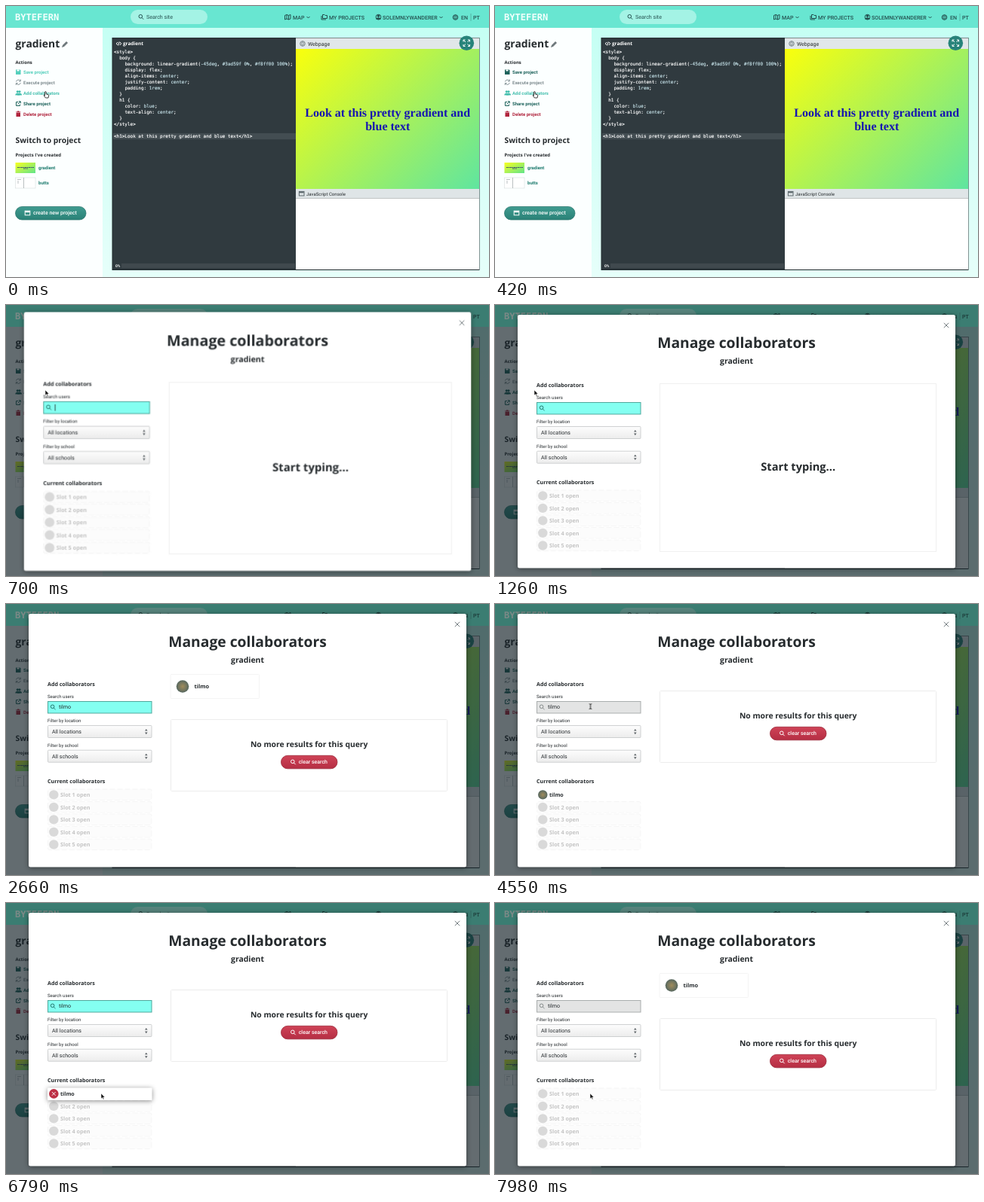
Recreate the animation shown at these times as an HTML page. Size 640 by 360 pixels, loop 8 s.

```html
<!DOCTYPE html>
<html lang="en">
<head>
<meta charset="utf-8">
<title>Manage collaborators</title>
<style>
html, body { margin: 0; width: 100%; height: 100%; overflow: hidden; background: #dcfff8; }
svg { display: block; width: 640px; height: 360px; }
text { text-rendering: geometricPrecision; font: 500 7px Roboto, sans-serif; fill: #262b2e; }
.h { font-family: "Open Sans", "Noto Sans", sans-serif; font-weight: 700; }
.mid { text-anchor: middle; }
.s6 { font-size: 6px; }
.b { font-weight: 700; }
.w { fill: #fff; }
.nav text { fill: #24504f; font-size: 7.08px; }
.nav .brand { font: 700 12.1px "DejaVu Sans Mono", monospace; fill: #f2fffc; }
.page { font: 700 16px "Liberation Serif", serif; fill: #1616b0; }
.code { font: 5.97px "DejaVu Sans Mono", monospace; fill: #fff; stroke: #fff; stroke-width: .15; }
.code .v { fill: #c3dfe6; stroke: #c3dfe6; }
.line { fill: none; stroke: currentColor; stroke-width: 1; }
.label { font-size: 6.05px; font-weight: 400; }
.field { font-size: 7.1px; font-weight: 400; }
.sub { font-size: 7.1px; }
.open { font-size: 7.2px; fill: #c4c4c4; }
.shadow { filter: drop-shadow(0 1px 3px rgba(0,0,0,.45)); }

/* 1% = 80ms */
.save, .add, .first, .results, .card, .cardHover, .member, .slot1, .slotHover, .panel,
.input, .glass, .caret, .type, .hand, .arrow, .ibeam { animation: 8s step-end infinite; }

.save { animation-name: save; }
@keyframes save { 0% { fill: #55cfbc; color: #55cfbc; } 4.4%, 100% { fill: #1d625b; color: #1d625b; } }
.add { animation-name: add; }
@keyframes add { 0% { fill: #45bfae; color: #45bfae; } 8%, 100% { fill: #1d625b; color: #1d625b; } }

.dim { animation: dim 8s linear infinite; }
@keyframes dim { 0% { opacity: 0; } 5.95% { opacity: 0; animation-timing-function: ease; } 7.9%, 100% { opacity: 1; } }
.modal { transform-origin: 320px 181px; animation: pop 8s linear infinite; }
@keyframes pop {
  0% { opacity: 0; transform: scale(.5); }
  6% { opacity: 0; transform: scale(.5); animation-timing-function: cubic-bezier(.54,1.12,.38,1.11); }
  9.75%, 100% { opacity: 1; transform: none; }
}

.first { animation-name: first; }
@keyframes first { 0% { opacity: 1; } 19.25%, 100% { opacity: 0; } }
.results { animation-name: results; }
@keyframes results { 0% { opacity: 0; } 19.25%, 100% { opacity: 1; } }
.type { animation-name: type; animation-fill-mode: backwards; }
@keyframes type { 0% { fill-opacity: 0; } 19.25%, 100% { fill-opacity: 1; } }
.caret { animation-name: caret; }
@keyframes caret { 0% { opacity: 1; } 13%, 100% { opacity: 0; } }

.card, .slot1 { animation-name: free; }
@keyframes free { 0% { opacity: 1; } 46% { opacity: 0; } 86.25%, 100% { opacity: 1; } }
.member { animation-name: taken; }
@keyframes taken { 0% { opacity: 0; } 46% { opacity: 1; } 86.25%, 100% { opacity: 0; } }
.panel { animation-name: panel; }
@keyframes panel { 0% { transform: none; } 46% { transform: translateY(-38px); } 86.25%, 100% { transform: none; } }
.cardHover { animation-name: cardHover; }
@keyframes cardHover { 0% { opacity: 0; } 43.5% { opacity: 1; } 46%, 100% { opacity: 0; } }
.slotHover { animation-name: slotHover; }
@keyframes slotHover { 0% { opacity: 0; } 77.25% { opacity: 1; } 86.25%, 100% { opacity: 0; } }

.input { animation-name: input; }
@keyframes input {
  0% { fill: #84fff1; stroke: #4fa79c; }
  45.5% { fill: #e3e4e4; stroke: #a9adad; }
  59.5% { fill: #84fff1; stroke: #4fa79c; }
  86.25%, 100% { fill: #e3e4e4; stroke: #a9adad; }
}
.glass { animation-name: glass; }
@keyframes glass {
  0% { color: #23766c; } 45.5% { color: #858b8b; }
  59.5% { color: #23766c; } 86.25%, 100% { color: #858b8b; }
}

.pointer { animation: move 8s ease-in-out infinite; }
@keyframes move {
  0%, 40.25% { transform: translate(52px,113px); }
  43.75%, 48.5% { transform: translate(268px,108px); }
  54%, 74.5% { transform: translate(126.5px,136px); }
  78%, 100% { transform: translate(126px,253px); }
}
.hand { animation-name: hand; }
@keyframes hand { 0% { opacity: 1; } 6.5% { opacity: 0; } 43.5% { opacity: 1; } 46%, 100% { opacity: 0; } }
.arrow { animation-name: arrow; }
@keyframes arrow {
  0% { opacity: 0; } 6.5% { opacity: 1; } 19.25% { opacity: 0; } 40.25% { opacity: 1; }
  43.5% { opacity: 0; } 46% { opacity: 1; } 53.5% { opacity: 0; } 75.5%, 100% { opacity: 1; }
}
.ibeam { animation-name: ibeam; }
@keyframes ibeam { 0% { opacity: 0; } 53.5% { opacity: 1; } 75.5%, 100% { opacity: 0; } }
</style>
</head>
<body>
<svg viewBox="0 0 640 360">
  <defs>
    <linearGradient id="mint" x2="0" y2="1"><stop stop-color="#c2fff3"/><stop offset="1" stop-color="#e6fffa"/></linearGradient>
    <linearGradient id="pretty" gradientUnits="userSpaceOnUse" x1="613" y1="257.5" x2="398" y2="42.5">
      <stop stop-color="#5fe5a0"/><stop offset="1" stop-color="#faff0c"/>
    </linearGradient>
    <linearGradient id="thumb" x1="1" y1="1" x2="0" y2="0">
      <stop stop-color="#5fe58a"/><stop offset="1" stop-color="#f8ff20"/>
    </linearGradient>
    <linearGradient id="teal" x2="0" y2="1"><stop stop-color="#409c90"/><stop offset="1" stop-color="#2a8177"/></linearGradient>
    <linearGradient id="red" x2="0" y2="1"><stop stop-color="#cf4357"/><stop offset="1" stop-color="#b52e43"/></linearGradient>
    <linearGradient id="select" x2="0" y2="1"><stop stop-color="#fdfdfd"/><stop offset="1" stop-color="#ececec"/></linearGradient>
    <radialGradient id="face"><stop stop-color="#a08c5c"/><stop offset=".6" stop-color="#77785f"/><stop offset="1" stop-color="#54665f"/></radialGradient>
    <g id="search" class="line"><circle cx="-.7" cy="-.7" r="2.3"/><path d="M1 1L3.2 3.2"/></g>
    <g id="globe" class="line"><circle r="3.3"/><path d="M-3 -1.2H3M-3 1.2H3M0 -3.3Q-3 0 0 3.3Q3 0 0 -3.3" stroke-width=".6"/></g>
    <g id="window" class="line"><rect x="-3.3" y="-2.8" width="6.6" height="5.6"/><path d="M-3 -1.6H3" stroke-width="1.6"/></g>
    <path id="down" class="line" d="M-2 -1L0 1L2 -1"/>
    <g id="slot">
      <rect x=".5" y="-7.2" width="137.5" height="14.6" rx="2" fill="#fcfcfc" stroke="#f0f0f0" stroke-width=".6" stroke-dasharray="7 3"/>
      <circle cx="8.3" cy=".2" r="6.2" fill="#d9d9d9"/>
    </g>
    <g id="dropdown">
      <rect x="55.5" y=".5" width="137.5" height="16" rx="1" fill="url(#select)" stroke="#c3c6c7" stroke-width=".8"/>
      <path d="M184 7.6L185.8 5L187.6 7.6ZM184 9.6L185.8 12.2L187.6 9.6Z" fill="#5d6367"/>
    </g>
    <g id="person"><circle cy="-1.7" r="1.6"/><path d="M-3 3Q-3 .3 0 .3Q3 .3 3 3Z"/></g>
  </defs>

  <rect width="640" height="360" fill="url(#mint)"/>
  <rect width="640" height="29" fill="#68e6d1"/>
  <rect y="29" width="128" height="331" fill="#fcffff"/>

  <g class="nav" color="#24504f">
    <text class="brand" x="12" y="19">BYTEFERN</text>
    <rect x="165" y="5" width="102" height="19" rx="9.5" fill="#a4f3e5"/>
    <use href="#search" x="179" y="14.5"/>
    <text x="186" y="17.2" style="font-weight:400">Search site</text>
    <path class="line" d="M369.5 12.5L372 11.5L374.5 12.5L377 11.5V17L374.5 18L372 17L369.5 18ZM372 11.5V17M374.5 12.5V18" stroke-width=".8"/>
    <text x="380" y="17.5">MAP</text><use href="#down" x="400.5" y="15"/>
    <path class="line" d="M419.5 11.5H422L423 12.5H425.5V16.5H419.5ZM418 13V18H424"/>
    <text x="428" y="17.5">MY PROJECTS</text>
    <circle class="line" cx="493.5" cy="14.7" r="3.4"/><use href="#person" x="493.5" y="14.9" fill="#24504f"/>
    <text x="499" y="17.5">SOLEMNLYWANDERER</text><use href="#down" x="576.5" y="15"/>
    <use href="#globe" x="595.5" y="15"/>
    <text x="603" y="17.5">EN</text><path d="M616 10V20" stroke="#55b3a5"/><text x="619" y="17.5">PT</text>
  </g>

  <g>
    <text class="h" x="12.5" y="55" style="font-size:13.9px">gradient</text>
    <path d="M74 55L75 52L80 47L82 49L77 54Z" fill="#6f797c"/>
    <text class="h s6" x="12.5" y="77">Actions</text>
    <g class="save"><path d="M13 84.5H18.5L19.5 85.5V91H13Z"/><path d="M14.5 84.5H17.5V86.5H14.5Z" fill="#fff"/></g>
    <text class="s6 b save" x="23" y="89.7">Save project</text>
    <path class="line" color="#89969a" d="M13.5 100.5A3 3 0 0 1 19 99.5M19.3 102A3 3 0 0 1 13.8 103M19.3 97.5V100H17M13.3 105V102.5H15.6"/>
    <text class="s6 b" x="23" y="103.6" style="fill:#7f8c90">Execute project</text>
    <g class="add"><use href="#person" x="15.3" y="115.5"/><use href="#person" x="18" y="115.5"/></g>
    <text class="s6 b add" x="23" y="117.6">Add collaborators</text>
    <path class="line" color="#1d625b" d="M16 127.5H13.5V132.5H18.5V130.5M15.5 130.5L19 127M16.8 126.8H19.3V129.3"/>
    <text class="s6 b" x="23" y="131.6" style="fill:#1d625b">Share project</text>
    <path d="M13.5 141.5H19V147H13.5ZM13 140.5H19.5V141H13ZM15 139.5H17.5V140.5H15Z" fill="#b0243d"/>
    <text class="s6 b" x="23" y="145.6" style="fill:#b0243d">Delete project</text>
    <text class="h" x="12.5" y="182" style="font-size:10.3px">Switch to project</text>
    <text class="h s6" x="12.5" y="200">Projects I've created</text>
    <rect x="12.5" y="208" width="26.5" height="14" fill="url(#thumb)"/>
    <path d="M15 214.5H37M23 216H29" stroke="#33406f" stroke-width=".9" stroke-dasharray="2 .5"/>
    <text class="s6 b" x="43" y="217" style="fill:#1c7a6d">gradient</text>
    <rect x="12.5" y="228" width="26.5" height="14" fill="#fff" stroke="#d6dcdc" stroke-width=".6"/>
    <path d="M15 230.5H20M15 233H17M15 235H17M23.5 228V242" stroke="#8b9598" stroke-width=".6"/>
    <text class="s6 b" x="43" y="237" style="fill:#1c7a6d">butts</text>
    <rect x="12.5" y="266.5" width="93.5" height="17.5" rx="8.7" fill="url(#teal)" stroke="#267269" stroke-width=".7"/>
    <use href="#window" x="28.5" y="275" color="#fff"/>
    <text class="w" x="36" y="277.3">create new project</text>
  </g>

  <rect x="140.5" y="42" width="487" height="309" fill="#1f292d"/>
  <rect x="141.5" y="42.5" width="242.5" height="307.5" fill="#303a3f"/>
  <rect x="142" y="169" width="242" height="8.2" fill="#434d52"/>
  <path class="line" color="#fff" d="M148 48L146.3 50L148 52M151 48L152.7 50L151 52M150.1 47.5L148.9 52.5"/>
  <text class="h w" x="155" y="52.3" style="font-size:6.4px">gradient</text>
  <text class="code">
    <tspan x="143" y="63.2">&lt;style&gt;</tspan>
    <tspan x="150.2" y="71.2">body {</tspan>
    <tspan x="157.4" y="79.2">background: linear-gradient(<tspan class="v">-45deg</tspan>, <tspan class="v">#3ad59f</tspan> <tspan class="v">0%</tspan>, <tspan class="v">#f8ff00</tspan> <tspan class="v">100%</tspan>);</tspan>
    <tspan x="157.4" y="87.2">display: flex;</tspan>
    <tspan x="157.4" y="95.2">align-items: <tspan class="v">center</tspan>;</tspan>
    <tspan x="157.4" y="103.2">justify-content: <tspan class="v">center</tspan>;</tspan>
    <tspan x="157.4" y="111.2">padding: <tspan class="v">1rem</tspan>;</tspan>
    <tspan x="150.2" y="119.2">}</tspan>
    <tspan x="150.2" y="127.2">h1 {</tspan>
    <tspan x="157.4" y="135.2">color: <tspan class="v">blue</tspan>;</tspan>
    <tspan x="157.4" y="143.2">text-align: <tspan class="v">center</tspan>;</tspan>
    <tspan x="150.2" y="151.2">}</tspan>
    <tspan x="143" y="159.2">&lt;/style&gt;</tspan>
    <tspan x="143" y="175.2">&lt;h1&gt;Look at this pretty gradient and blue text&lt;/h1&gt;</tspan>
  </text>
  <rect x="153" y="342" width="230" height="6" fill="#40494e"/>
  <text class="w b" x="145" y="346.5" style="font-size:5px">0%</text>

  <rect x="384" y="42.5" width="243" height="15" fill="#e1e7e9"/>
  <use href="#globe" x="393" y="50" color="#7d898d"/>
  <text x="400" y="52.5" style="font-weight:400">Webpage</text>
  <rect x="384" y="57" width="243" height="186" fill="url(#pretty)"/>
  <g class="mid">
    <text class="page" x="505.7" y="146.7">Look at this pretty gradient and</text>
    <text class="page" x="505.7" y="164.7">blue text</text>
  </g>
  <rect x="384" y="243" width="243" height="12.5" fill="#dfe5e7"/>
  <use href="#window" x="391.7" y="249.2" color="#5c686c"/>
  <text class="label" x="398" y="251.5">JavaScript Console</text>
  <rect x="384" y="255.5" width="243" height="94.5" fill="#fff"/>
  <circle cx="610.3" cy="49.3" r="9.8" fill="#27837a"/>
  <path class="line" color="#fff" d="M606 47.5V45H608.5M612 45H614.5V47.5M614.5 51V53.5H612M608.5 53.5H606V51M606.3 45.3L609 48M614.2 45.3L611.5 48M614.2 53.2L611.5 50.5M606.3 53.2L609 50.5"/>

  <g class="dim">
    <rect width="640" height="29" fill="#14201f" opacity=".53"/>
    <rect y="29" width="640" height="331" fill="#142026" opacity=".66"/>
  </g>

  <g class="modal">
    <rect class="shadow" x="30" y="13" width="580" height="336.5" rx="2.5" fill="#fff"/>
    <path class="line" color="#777f83" d="M594.8 23.8L601.2 30.2M601.2 23.8L594.8 30.2" stroke-width="1.3"/>
    <text class="h mid" x="320" y="57" style="font-size:19.3px">Manage collaborators</text>
    <text class="h mid" x="320" y="78" style="font-size:10.4px">gradient</text>

    <text class="h sub" x="55" y="109.3">Add collaborators</text>
    <text class="label" x="55" y="124.5">Search users</text>
    <rect class="input" x="55.5" y="129.5" width="137.5" height="15.5"/>
    <g class="glass"><use href="#search" x="62.3" y="137"/></g>
    <path class="caret" d="M70.5 133V141.5" stroke="#222" stroke-width=".8"/>
    <text class="field" x="70" y="139.3"><tspan class="type">t</tspan><tspan class="type" style="animation-delay:.1s">i</tspan><tspan class="type" style="animation-delay:.2s">l</tspan><tspan class="type" style="animation-delay:.3s">m</tspan><tspan class="type" style="animation-delay:.4s">o</tspan></text>
    <text class="label" x="55" y="157">Filter by location</text>
    <use href="#dropdown" y="161"/><text class="field" x="61" y="172">All locations</text>
    <text class="label" x="55" y="189.5">Filter by school</text>
    <use href="#dropdown" y="193.7"/><text class="field" x="61" y="204.6">All schools</text>

    <text class="h sub" x="55" y="238">Current collaborators</text>
    <g class="slot1"><g transform="translate(55 253.2)"><use href="#slot"/><text class="h open" x="17" y="2.8">Slot 1 open</text></g></g>
    <g transform="translate(55 269.7)"><use href="#slot"/><text class="h open" x="17" y="2.8">Slot 2 open</text></g>
    <g transform="translate(55 286.2)"><use href="#slot"/><text class="h open" x="17" y="2.8">Slot 3 open</text></g>
    <g transform="translate(55 302.7)"><use href="#slot"/><text class="h open" x="17" y="2.8">Slot 4 open</text></g>
    <g transform="translate(55 319.3)"><use href="#slot"/><text class="h open" x="17" y="2.8">Slot 5 open</text></g>
    <g class="member">
      <circle cx="63.3" cy="253.4" r="6.2" fill="url(#face)"/>
      <g class="slotHover">
        <rect class="shadow" x="55" y="245.5" width="138.5" height="16.5" rx="1" fill="#fff"/>
        <circle cx="63.3" cy="253.4" r="6.3" fill="#bd3146"/>
        <path class="line" color="#fff" d="M61 251.1L65.6 255.7M65.6 251.1L61 255.7" stroke-width="1.2"/>
      </g>
      <text class="h sub" x="72" y="256">tilmo</text>
    </g>

    <g class="first">
      <rect x="218.5" y="104.5" width="366" height="223" fill="none" stroke="#f0f0f0"/>
      <text class="h mid" x="401.7" y="220.3" style="font-size:14.65px">Start typing...</text>
    </g>
    <g class="results">
      <g class="card">
        <rect x="218" y="93.5" width="117.5" height="32" rx="1" fill="#fff" stroke="#f1f1f1" stroke-width=".8"/>
        <rect class="cardHover shadow" x="218" y="93.5" width="117.5" height="32" rx="1" fill="#fff"/>
        <circle cx="234" cy="109.5" r="8.3" fill="url(#face)"/>
        <text class="h" x="249.5" y="112.2" style="font-size:7.4px">tilmo</text>
      </g>
      <g class="panel">
        <rect x="218.5" y="153.5" width="366" height="95" rx="1" fill="none" stroke="#ececec"/>
        <text class="h mid" x="401.7" y="190" style="font-size:10.35px">No more results for this query</text>
        <rect x="364.5" y="201.3" width="74.5" height="17.5" rx="8.7" fill="url(#red)" stroke="#9c2b3c" stroke-width=".8"/>
        <use href="#search" x="380.5" y="210" color="#fff"/>
        <text class="w" x="387.7" y="212.4">clear search</text>
      </g>
    </g>
  </g>

  <g class="pointer">
    <path class="arrow" d="M0 0V7L1.7 5.5L2.9 8L4 7.5L2.8 5.1H5Z" fill="#111" stroke="#fff" stroke-width=".5"/>
    <path class="hand" d="M-.5 1Q.4 .2 1.2 1V4L4.2 4.7Q4.9 5 4.7 6L4 9H.4L-2 5.8Q-1.5 5 -.5 6Z" fill="#fff" stroke="#111" stroke-width=".8"/>
    <path class="ibeam line" color="#222" d="M-1.6 -3.3Q0 -3.3 0 -2.3Q0 -3.3 1.6 -3.3M0 -2.5V2.8M-1.6 3.5Q0 3.5 0 2.5Q0 3.5 1.6 3.5"/>
  </g>
</svg>
</body>
</html>
```
